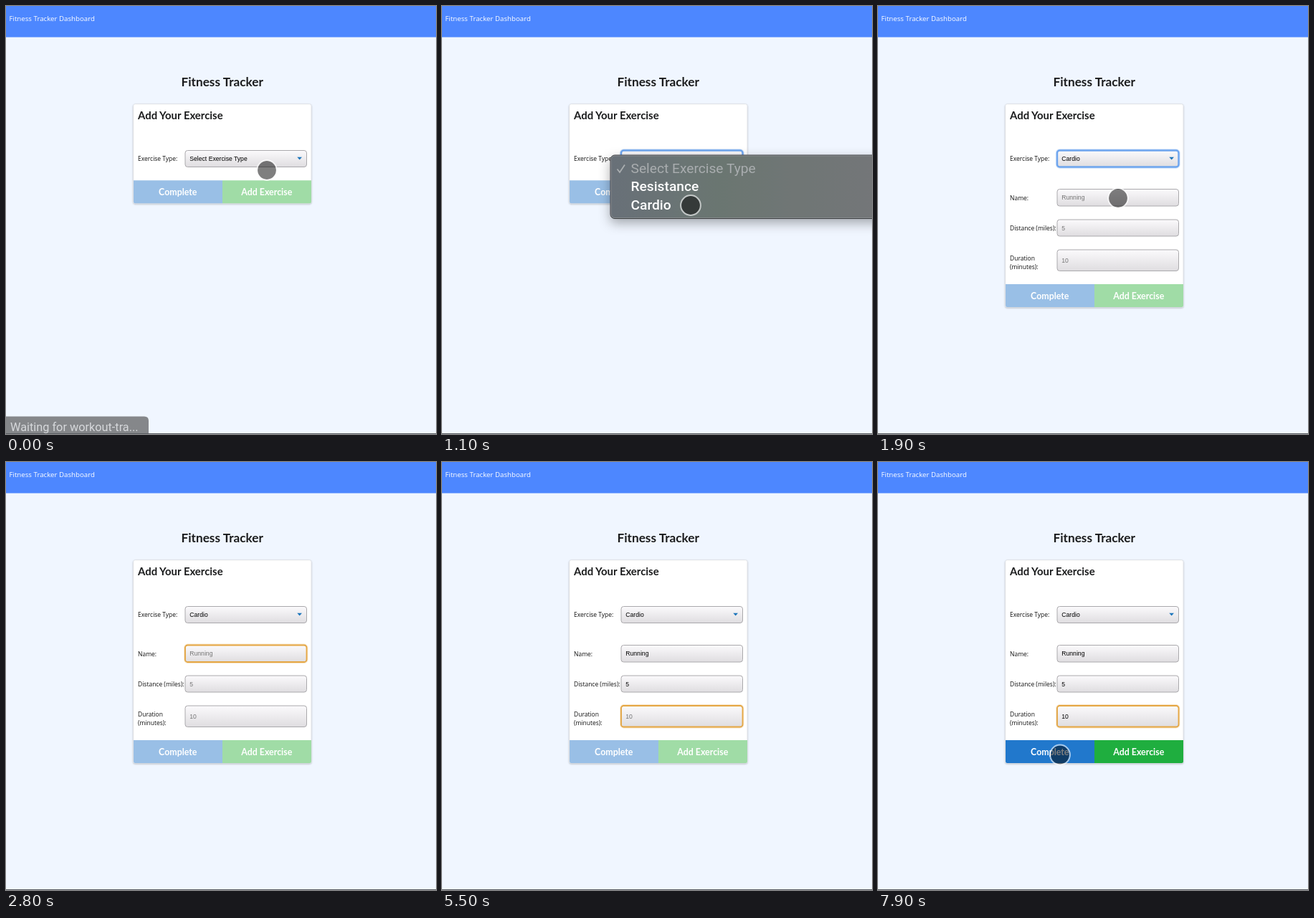
Recreate the animation shown at these times as an HTML page. Size 600 px wide and 597 px high, loop 8000 ms.

```html
<!DOCTYPE html>
<html lang="en">
<head>
<meta charset="utf-8">
<title>Fitness Tracker</title>
<style>
  html, body { margin: 0; width: 100%; height: 100%; overflow: hidden; background: #f0f6ff; }
  svg { display: block; width: 100vw; height: 100vh; }
  text { white-space: pre; }
  .head { font-family: Lato, sans-serif; font-weight: 700; fill: #1b1c1d; }
  .label { font: 8.5px "Open Sans", sans-serif; fill: #111; }
  .value { font: 8.65px "Liberation Sans", Arial, sans-serif; fill: #000; }
  .button { font: 700 12.4px Lato, sans-serif; fill: #fff; text-anchor: middle; }
  .menu { font: 500 19.2px Roboto, sans-serif; fill: #fff; }
  .status { font: 16.3px Roboto, sans-serif; fill: #d6d8db; }
</style>
</head>
<body>
<svg id="stage" viewBox="0 0 600 597" preserveAspectRatio="none">
  <defs>
    <linearGradient id="fieldFill" x2="0" y2="1">
      <stop offset="0" stop-color="#fbfafc"/>
      <stop offset="1" stop-color="#dfdde0"/>
    </linearGradient>
    <linearGradient id="menuFill">
      <stop offset="0" stop-color="#687078"/>
      <stop offset=".4" stop-color="#6b7671"/>
      <stop offset="1" stop-color="#747679"/>
    </linearGradient>
    <filter id="cardShadow" x="-10%" y="-10%" width="120%" height="120%">
      <feDropShadow dx="0" dy="1" stdDeviation="1.3" flood-color="#222426" flood-opacity=".28"/>
    </filter>
    <filter id="menuShadow" x="-15%" y="-40%" width="130%" height="200%">
      <feDropShadow dx="0" dy="6" stdDeviation="8" flood-color="#000" flood-opacity=".32"/>
    </filter>
  </defs>

  <rect width="600" height="597" fill="#f0f6ff"/>
  <rect width="600" height="43.5" fill="#4d87ff"/>
  <text x="4.5" y="20.6" font-family="Open Sans, sans-serif" font-size="9.7" fill="#fff">Fitness Tracker Dashboard</text>
  <text class="head" x="301.7" y="111.5" font-size="17.2" text-anchor="middle">Fitness Tracker</text>

  <rect id="card" x="177.7" y="136.7" width="248.3" rx="2.6" fill="#fff" stroke="#d4d6da" stroke-width=".6" filter="url(#cardShadow)"/>
  <text class="head" x="184" y="158" font-size="14.9">Add Your Exercise</text>
  <text class="label" x="184" y="216.3">Exercise Type:</text>
  <g id="select"></g>
  <g id="inputs">
    <text class="label" x="184" y="271">Name:</text>
    <text class="label" x="184" y="313">Distance (miles):</text>
    <text class="label" x="184" y="355">Duration</text>
    <text class="label" x="184" y="367">(minutes):</text>
  </g>
  <g id="buttons">
    <path id="complete" d="M178 0H302V32H180.5Q178 32 178 29.5Z"/>
    <path id="add" d="M302 0H426V29.5Q426 32 423.5 32H302Z"/>
    <text class="button" x="239.8" y="20.8">Complete</text>
    <text class="button" x="363.8" y="20.8">Add Exercise</text>
  </g>

  <g id="status">
    <path d="M0 572.5H193Q199 572.5 199 578.5V597H0Z" fill="#85878a"/>
    <text class="status" x="6" y="593">Waiting for workout-tra...</text>
  </g>
  <rect y="596" width="600" height="1" fill="#5a5d62"/>

  <g id="menu">
    <rect x="235" y="208" width="380" height="88.5" rx="6" fill="url(#menuFill)" stroke="#3c3f42" filter="url(#menuShadow)"/>
    <rect x="236" y="209" width="378" height="86.5" rx="5" fill="none" stroke="#8d9194" stroke-width=".8"/>
    <path d="M244.5 227.5L248 232L255 221.5" fill="none" stroke="#abafb1" stroke-width="1.7"/>
    <text class="menu" x="263.5" y="233" style="fill:#a9adaf;font-weight:400">Select Exercise Type</text>
    <text class="menu" x="263.5" y="258.3">Resistance</text>
    <text class="menu" x="263.5" y="284">Cardio</text>
  </g>

  <g id="cursor">
    <circle r="13" fill="#000" fill-opacity=".5"/>
    <circle r="13.9" fill="none" stroke="#fff" stroke-opacity=".6" stroke-width="2"/>
  </g>
</svg>
<script>
const LOOP = 8000, STEP = 100;
const $ = id => document.getElementById(id);

function make(tag, parent, attrs) {
  const el = document.createElementNS("http://www.w3.org/2000/svg", tag);
  for (const k in attrs) el.setAttribute(k, attrs[k]);
  return parent.appendChild(el);
}
const show = (el, on) => el.setAttribute("visibility", on ? "visible" : "hidden");

// A field box with its focus ring, text and caret.
function field(parent, y, h, base, ringColor, ringWidth) {
  const box = { x: 250, y, width: 169.5, height: h, rx: 3.5 };
  const glow = make("rect", parent, { ...box, fill: "none", stroke: ringColor, "stroke-width": ringWidth + 2, "stroke-opacity": .3 });
  make("rect", parent, { ...box, fill: "url(#fieldFill)", stroke: "#aaa9ac", "stroke-width": 1 });
  const ring = make("rect", parent, { ...box, fill: "none", stroke: ringColor, "stroke-width": ringWidth });
  const text = make("text", parent, { class: "value", x: 256.3, y: base });
  const caret = make("rect", parent, { y: base - 8.5, width: .8, height: 10.5, fill: "#000" });
  return { glow, ring, text, caret };
}

const select = field($("select"), 201.5, 23, 215.8, "#6ea5ee", 2.4);
make("path", $("select"), { d: "M406.3 210.7H413L409.65 214.6Z", fill: "#1b75bb" });

const inputs = [
  { y: 255.5, h: 23.5, base: 270.3, hint: "Running", keys: [2900, 3000, 3100, 3300, 3400, 3500, 3700], from: 2300, to: 4100 },
  { y: 298, h: 23, base: 312.8, hint: "5", keys: [4500], from: 4100, to: 5000 },
  { y: 340, h: 29.5, base: 358, hint: "10", keys: [6300, 6400], from: 5000, to: LOOP }
].map(f => ({ ...f, ...field($("inputs"), f.y, f.h, f.base, "#e5a744", 1.8) }));

// Time, x, y of the pointer.
const path = [
  [0, 364, 229], [400, 364, 229], [700, 360, 215], [800, 360, 215], [1000, 347, 278],
  [1400, 347, 278], [1900, 335, 268], [2100, 335, 268], [2400, 332, 268],
  [6500, 332, 268], [7000, 368, 367], [7100, 368, 368], [7800, 254, 408.5], [LOOP, 254, 408.5]
];

function pointer(t) {
  const i = path.findIndex(p => p[0] > t), a = path[i - 1], b = path[i];
  const u = (t - a[0]) / (b[0] - a[0]), e = u * u * (3 - 2 * u);
  return [a[1] + (b[1] - a[1]) * e, a[2] + (b[2] - a[2]) * e];
}

function drawInput(f, t, open) {
  const focus = t >= f.from && t < f.to;
  const typed = f.keys.filter(k => k <= t);
  const last = Math.max(f.from, ...typed);
  f.text.textContent = typed.length ? f.hint.slice(0, typed.length) : f.hint;
  f.text.style.fill = typed.length ? "#000" : "#757575";
  show(f.ring, open && focus);
  show(f.glow, open && focus);
  show(f.caret, open && focus && (t - last) % 1000 < 500);
  f.caret.setAttribute("x", 256.3 + (typed.length ? f.text.getComputedTextLength() : 0));
}

function draw(t) {
  const open = t >= 1500, ready = t >= 6300;
  const bottom = open ? 420 : 275.2;

  $("card").setAttribute("height", bottom - 136.7);
  $("buttons").setAttribute("transform", `translate(0 ${bottom - 32})`);
  $("complete").setAttribute("fill", ready ? "#2178cc" : "#99bfe6");
  $("add").setAttribute("fill", ready ? "#1fae3f" : "#a0dca6");

  $("inputs").style.display = open ? "" : "none";
  inputs.forEach(f => drawInput(f, t, open));

  select.text.textContent = open ? "Cardio" : "Select Exercise Type";
  const picked = t >= 700 && t < 2300;
  show(select.ring, picked);
  show(select.glow, picked);
  show(select.caret, false);

  show($("status"), t < 500);
  show($("menu"), t >= 700 && t < 1400);
  $("menu").setAttribute("opacity", t < 1200 ? 1 : Math.max(0, (1450 - t) / 350));

  show($("cursor"), t < 2600 || t >= 6500);
  $("cursor").setAttribute("transform", `translate(${pointer(t)})`);
}

const start = performance.now();
function tick() {
  const t = Math.max(0, performance.now() - start) % LOOP;
  draw(Math.floor(t / STEP) * STEP);
  requestAnimationFrame(tick);
}
tick();
</script>
</body>
</html>
```
